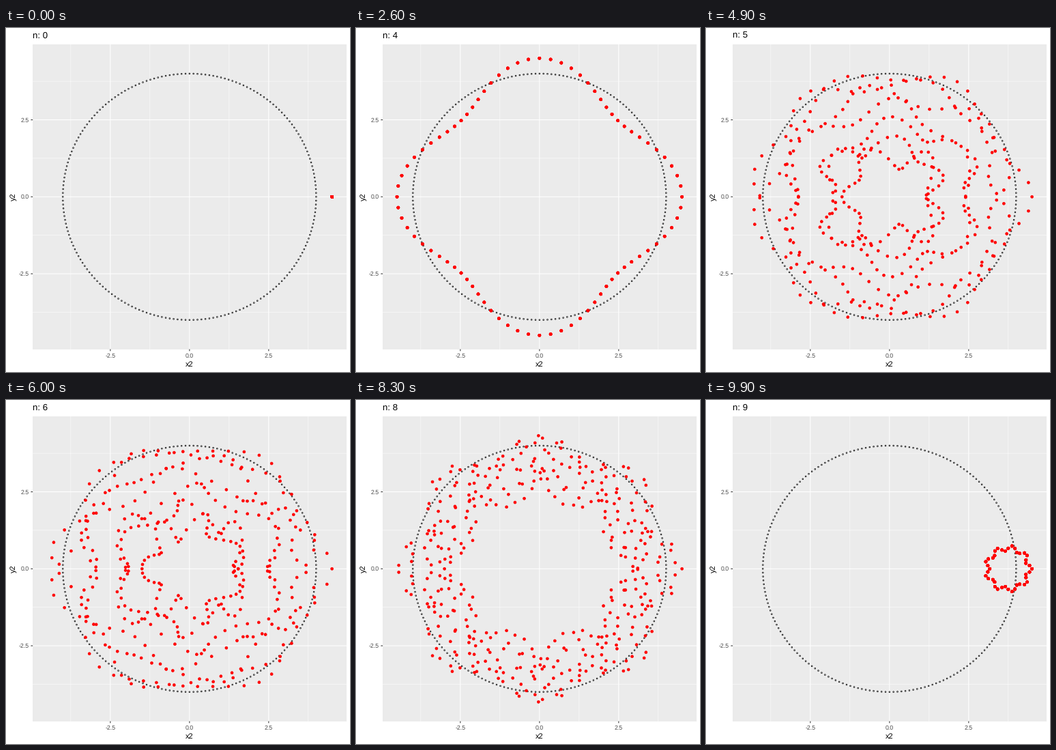
These frames come from a looping animation (504 px wide and 504 px high, 10 s). A matplotlib script:

```python
import numpy as np
import matplotlib.pyplot as plt
from matplotlib.animation import FuncAnimation
from matplotlib.lines import Line2D

plt.rcParams["font.family"] = "Liberation Sans"
plt.rcParams["text.hinting"] = "none"

SIZE = 504
LEFT, RIGHT, TOP, BOTTOM = 39.2, 498.5, 24.0, 470.6
LIMIT = 4.95
MAJOR = (-2.5, 0, 2.5)
MINOR = (-3.75, -1.25, 1.25, 3.75)

LOBES = (0, 3, 4, 5, 6, 7, 8, 9)
STARTS = (7, 20, 33, 46, 59, 71, 83, 95)   # first moving frame after each state
STEPS = 6
POINTS = 400

fig = plt.figure(figsize=(SIZE / 72, SIZE / 72), dpi=72, facecolor="white")
ax = fig.add_axes([LEFT / SIZE, 1 - BOTTOM / SIZE,
                   (RIGHT - LEFT) / SIZE, (BOTTOM - TOP) / SIZE])
ax.set(xlim=(-LIMIT, LIMIT), ylim=(-LIMIT, LIMIT), facecolor="#EBEBEB",
       xticks=[], yticks=[])
for spine in ax.spines.values():
    spine.set_visible(False)


def label(x, y, text, size, color="black", **style):
    """Place text by stage pixels, measured from the top left."""
    return fig.text(x / SIZE, 1 - y / SIZE, text, fontsize=size, color=color,
                    va="baseline", **style)


def tick(x0, y0, x1, y1):
    fig.add_artist(Line2D([x0 / SIZE, x1 / SIZE], [1 - y0 / SIZE, 1 - y1 / SIZE],
                          color="#333333", lw=1.07, snap=False,
                          solid_capstyle="butt"))


def draw_axes():
    for values, width in ((MINOR, 0.53), (MAJOR, 1.07)):
        for v in values:
            ax.axvline(v, color="white", lw=width, snap=False, zorder=0.5)
            ax.axhline(v, color="white", lw=width, snap=False, zorder=0.5)
    for v in MAJOR:
        px = LEFT + (v + LIMIT) / (2 * LIMIT) * (RIGHT - LEFT)
        py = BOTTOM - (v + LIMIT) / (2 * LIMIT) * (BOTTOM - TOP)
        tick(px, BOTTOM, px, BOTTOM + 2.75)
        tick(LEFT - 2.75, py, LEFT, py)
        label(px, 483, f"{v:.1f}", 8.8, "#4D4D4D", ha="center")
        label(34.2, py + 3.1, f"{v:.1f}", 8.8, "#4D4D4D", ha="right")
    label((LEFT + RIGHT) / 2, 496, "x2", 11, ha="center")
    label(13.4, (TOP + BOTTOM) / 2, "y2", 11, ha="center", rotation=90,
          rotation_mode="anchor")


def rosette(n):
    """Points of a closed curve with n lobes; n = 0 collapses to one spot."""
    turn = (n + 1) if n else 0
    theta = turn * 2 * np.pi * np.arange(POINTS) / POINTS
    r = 4 + 0.5 * np.cos(n * theta)
    return np.column_stack([r * np.cos(theta), r * np.sin(theta)])


draw_axes()
angle = np.linspace(0, 2 * np.pi, 200, endpoint=False)
# Per-point sizes keep the markers at sub-pixel positions.
ax.scatter(4 * np.cos(angle), 4 * np.sin(angle), s=np.full(200, 1.77 ** 2),
           facecolors="none", edgecolors="black", linewidths=0.7, zorder=2)

states = [rosette(n) for n in LOBES]
dots = ax.scatter(*states[0].T, s=np.full(POINTS, 3.9 ** 2), facecolors="red",
                  edgecolors="red", linewidths=0.7, zorder=3, clip_on=False)
title = label(LEFT, 15, "n: 0", 13.2, ha="left")


def update(frame):
    # The title follows one frame after the points arrive.
    k = sum(frame > start + STEPS - 1 for start in STARTS)
    mix = np.clip((frame - STARTS[k] + 1) / STEPS, 0, 1)
    following = states[(k + 1) % len(states)]
    dots.set_offsets((1 - mix) * states[k] + mix * following)
    title.set_text(f"n: {LOBES[k]}")
    return dots, title


def shown(frame):
    update(frame)
    arrived = [start + STEPS - 1 for start in STARTS]
    if frame in arrived:
        title.set_text(f"n: {LOBES[arrived.index(frame)]}")
    return dots, title


anim = FuncAnimation(fig, shown, frames=100, interval=100, repeat=True,
                     repeat_delay=0, blit=False)
plt.show()
```
